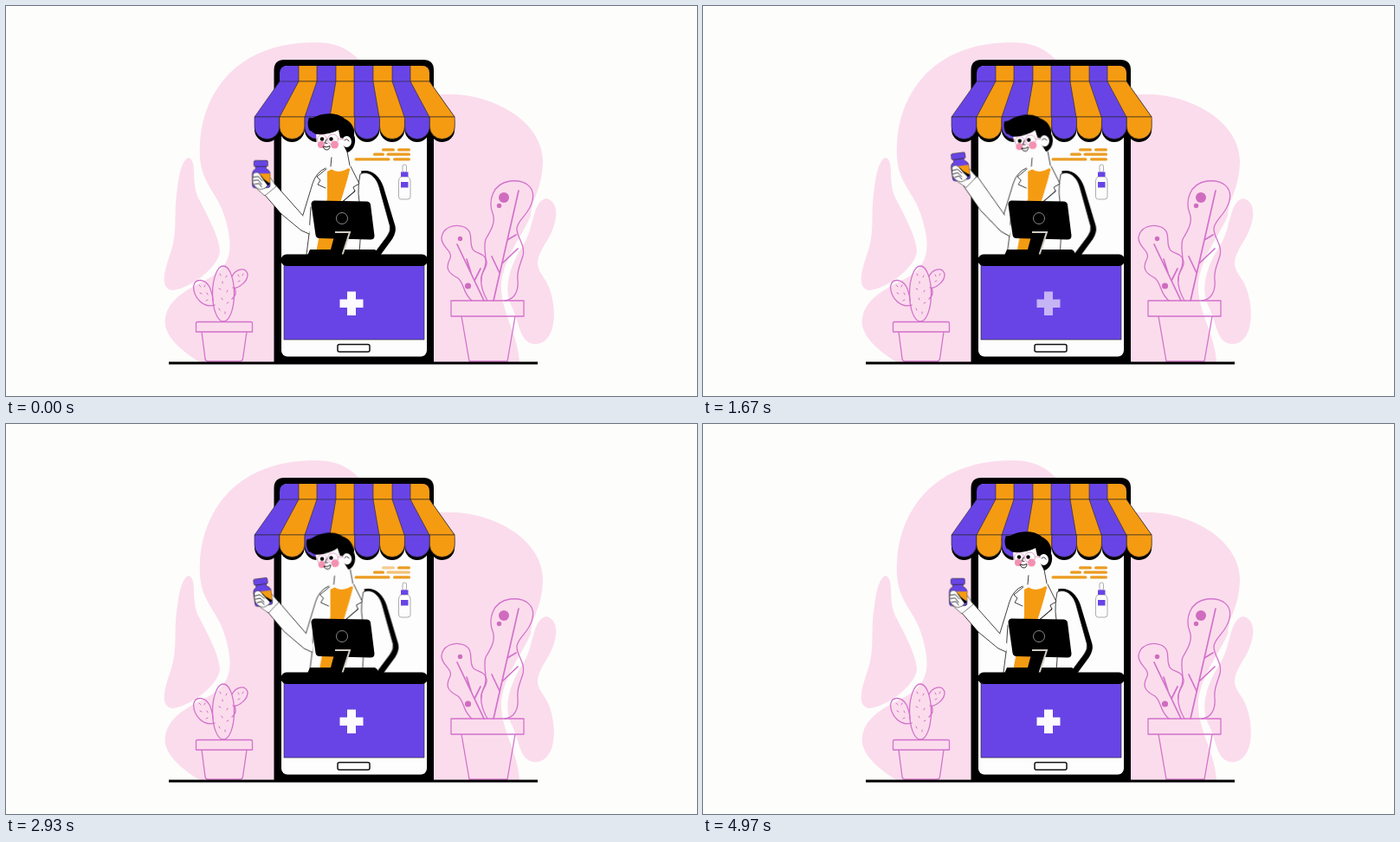
Write an HTML page without scripts that moves like this. It is 798x450 px and loops after 5.01 s.

```html
<!DOCTYPE html>
<html lang="en">
<head>
<meta charset="utf-8">
<title>Pharmacy shop</title>
<style>
html, body { margin: 0; width: 100%; height: 100%; overflow: hidden; background: #fdfdfc; }
svg { display: block; width: 100vw; height: 100vh; }
.purple { fill: #6844e6; }
.orange { fill: #f59b12; }
.blob { fill: #fbdcec; }
.white { fill: #fdfdfd; }
.thin { stroke: #222; stroke-width: .6; }
.line { fill: none; stroke: #111; stroke-width: .8; stroke-linecap: round; stroke-linejoin: round; }
.plant { fill: none; stroke: #d272cc; stroke-width: 1.3; stroke-linejoin: round; stroke-linecap: round; }
.dot { fill: #cf6cc0; }

.body, .head, .sleeve, .lift { animation: 5.01s ease-in-out infinite; }
.body { animation-name: sway; }
.head { animation-name: nod; transform-origin: 384px 188px; }
.sleeve { animation-name: reach; transform-origin: 343px 250px; }
.sleeve path { vector-effect: non-scaling-stroke; }
.lift { animation-name: lift; }
.wrist { animation: tilt 1.2525s ease-in-out infinite; transform-origin: 303px 212px; }
.cross { animation: blink 1.002s infinite; fill: #fdfaff; }

@keyframes sway { 0%, 97%, 100% { transform: none; } 40% { transform: translateX(4.5px); } }
@keyframes nod { 0%, 97%, 100% { transform: rotate(0deg); } 35%, 55% { transform: rotate(-6deg); } }
@keyframes reach {
  0%, 97%, 100% { transform: none; }
  26% { transform: rotate(7.6deg) scale(1.16); }
  50% { transform: rotate(1deg) scale(1.02); }
}
@keyframes lift {
  0%, 97%, 100% { transform: none; }
  26% { transform: translateY(-12px); }
  50% { transform: translateY(-1.5px); }
}
@keyframes tilt { 0%, 100% { transform: rotate(1.5deg); } 42% { transform: rotate(-6.5deg); } }
@keyframes blink { 0%, 13%, 90%, 100% { opacity: 1; } 29%, 63% { opacity: .55; } }

.note rect { animation: 5.01s infinite; fill: #eb9c22; }
.note .a { animation-name: dipA; animation-duration: 1.67s; }
.note .b { animation-name: dipB; }
.note .d { animation-name: dipD; }
.note .f { animation-name: dipF; }
@keyframes dipA { 0%, 52%, 100% { opacity: 1; } 76% { opacity: .5; } }
@keyframes dipB { 0%, 5%, 20%, 66%, 81%, 100% { opacity: 1; } 12.6%, 73.3% { opacity: .45; } }
@keyframes dipD { 0%, 5%, 20%, 51%, 66%, 100% { opacity: 1; } 12.6%, 58.5% { opacity: .6; } }
@keyframes dipF { 0%, 5%, 20%, 35%, 50%, 100% { opacity: 1; } 12.6%, 42.5% { opacity: .55; } }
</style>
</head>
<body>
<svg viewBox="0 0 798 450">
  <defs>
    <path id="flap" d="M287 128v11a14.45 14.45 0 0 0 28.9 0v-11z"/>
    <g id="flaps">
      <use href="#flap"/><use href="#flap" x="57.8"/><use href="#flap" x="115.6"/><use href="#flap" x="173.4"/>
    </g>
    <clipPath id="top"><path d="M316 87V78q0-9 9-9H480q9 0 9 9V87z"/></clipPath>
  </defs>

  <g class="blob">
    <path d="M224 411C205 400 180 380 184 360C188 335 215 325 238 312C262 297 262 275 253 245C244 212 221 205 224 160C226 105 262 42 357 42C395 42 405 60 425 80C450 105 470 102 520 102C575 106 622 140 620 182C618 215 607 222 606 242C598 262 575 290 572 320C570 350 592 380 593 411Z"/>
    <path d="M211 175C222 179 212 205 224 225C236 248 246 268 247 283C245 303 210 327 192 328C177 326 183 305 190 285C199 258 193 238 198 210C200 192 204 177 211 175Z"/>
    <path d="M624 222C640 226 638 250 624 272C610 295 612 300 622 315C636 335 640 388 612 390C592 390 594 365 583 345C572 320 588 290 598 275C610 255 608 225 624 222Z"/>
  </g>

  <!-- cactus -->
  <g class="plant">
    <ellipse cx="251" cy="332" rx="12.5" ry="32"/>
    <path d="M241 345C227 349 217 336 216.500 324C218 313 230 315 235 324C238 331 239 336 239 340"/>
    <path d="M262 325C267 327 280 318 279 309C276 300 265 304 261 312M261 338C265 335 266 330 264 325"/>
    <path stroke-width="1" d="M223 322l2 2M230 322l-1 2M224 331l2 1M232 331l1 2M231 340l2-1M247 309l1 2M255 311l-1 2M250 318v2M246 326l2 1M256 328l-1 2M249 337l1 2M257 342l-2 1M246 349l1 2M253 353v2M268 310l1 2M274 309l-1 2M268 318l2-1"/>
    <path d="M221 364.500H283q1.500 0 1.500 1.500V376H219.500V366q0-1.500 1.500-1.500ZM226 376L230 407q.5 3 3 3H270q3 0 3.500-3L278 376"/>
  </g>

  <!-- leafy plant -->
  <g class="plant">
    <path d="M556 340C549 328 546 317 551 306C558 294 550 281 554 269C560 259 566 249 562 239C557 226 561 205 582 202C602 200 611 211 608 224C605 240 592 245 590 256C589 267 600 274 597 288C593 301 590 306 591 317C592 329 587 339 576 340"/>
    <path d="M538 340C527 331 530 321 522 314C510 308 507 302 513 291C516 282 502 278 503 267C505 255 518 251 529 255C542 261 533 274 540 282C546 287 553 285 555 295C556 303 547 308 549 317"/>
    <path stroke-width="1.700" d="M592 213L563 340M521 275L552 340M589 264L579 270M570 308L561 289M573 297L591 280M537 308L532 292M541 317L548 303"/>
    <path d="M514 340H598V358H514ZM526 358L535 410H579L588 358"/>
  </g>
  <g class="dot">
    <circle cx="575" cy="221" r="6"/><circle cx="569.500" cy="230.500" r="2.700"/>
    <circle cx="524.500" cy="268.500" r="2.700"/><circle cx="533.500" cy="323" r="3.600"/>
  </g>

  <!-- phone -->
  <path d="M188 412H614" stroke="#000" stroke-width="3"/>
  <path d="M309.500 412V74q0-12 12-12H482q12 0 12 12V412Z"/>
  <rect class="white" x="318" y="69" width="168" height="335.500" rx="7"/>

  <!-- notes and dropper -->
  <g class="note">
    <rect class="a" x="434" y="164.300" width="15" height="3.200" rx="1.600"/>
    <rect class="b" x="452" y="164.300" width="15" height="3.200" rx="1.600"/>
    <rect x="424" y="169.600" width="13" height="3.200" rx="1.600"/>
    <rect class="d" x="439.500" y="169.600" width="27.500" height="3.200" rx="1.600"/>
    <rect x="402.500" y="175.300" width="41" height="3.200" rx="1.600"/>
    <rect class="f" x="447" y="175.300" width="20" height="3.200" rx="1.600"/>
  </g>
  <g fill="#fdfdfd" stroke="#999" stroke-width=".8">
    <rect x="458" y="183" width="4.500" height="9" rx="2"/>
    <path d="M456 197H464.500Q467 199 467 202V220q0 3-3 3H456.500q-3 0-3-3V202Q453.500 199 456 197Z"/>
  </g>
  <path class="purple" d="M456 191.500h8.500v5.500h-8.500zM456 203h8.500v6.500h-8.500z"/>

  <!-- awning -->
  <g transform="translate(0 3.500)"><use href="#flaps"/><use href="#flaps" x="28.900"/></g>
  <g clip-path="url(#top)">
    <path class="purple" d="M316 69H489V87H316z"/>
    <path class="orange thin" d="M338 68h21v20h-21zM381 68h21v20h-21zM424 68h22v20h-22zM467 68h23v20h-23z"/>
  </g>
  <path class="purple thin" d="M316 87H489L518 128H287z"/>
  <path class="orange thin" d="M338 87H359L345 128H316zM381 87H402V128H374zM424 87H446L460 128H431zM467 87H489L518 128H489z"/>
  <use href="#flaps" class="purple thin"/>
  <use href="#flaps" class="orange thin" x="28.900"/>

  <!-- pharmacist -->
  <g class="body">
    <path d="M408 191C420 187 431 194 436 209L449.500 254Q451 261 446 269L432 288H405Z"/>
    <path class="white" d="M369 187Q358 192 354 205L343 241L341 259L350 263L347 288H424L410 190L397 182Z"/>
    <path class="line" stroke-width=".6" d="M369 187Q358 192 354 205L343 241M352 232L350 263L347 287"/>
    <path class="orange" d="M371 191Q383 184 398 188L387 224L381 285H358L363 258L371 222Z"/>
    <path class="white" d="M409 194C419 189 428 198 431 209L443.500 254Q444.500 260 440 266L425 286H408L411 240Q404 216 409 194Z" stroke="#111" stroke-width=".8"/>
    <path class="white" d="M371 188L359 197L363 201L360 206L371 214ZM398 185L408 205L401 209L403 214L388 226Z"/>
    <path class="line" d="M370 188L359 197L363 201L360 206L369 210M398 185L408 205L401 209L403 214L388 226"/>
    <path class="line" stroke-width="1.600" d="M403 213L390 225"/>
    <path class="white" d="M376 166L375 184Q374 190 384 191Q394 190 398 184L394 162Z"/>
    <path class="line" stroke-width=".6" d="M376 174L375 185M394 168L397 184"/>

    <g class="sleeve">
      <path class="white" d="M311 206L343 242L352 255L350 263L341 259L318 240L298 217Z"/>
      <path class="line" stroke-width=".6" d="M343 242L311 206L298 217L318 240L341 259L350 263"/>
    </g>
    <g class="lift"><g class="wrist">
      <path class="white" d="M288 200Q284 208 293 214L299 219L312 208L305 198Z" stroke="#222" stroke-width=".6"/>
      <g transform="rotate(-2 294 195)">
        <rect class="purple thin" x="286" y="178.500" width="16" height="7" rx="1.500"/>
        <path class="purple thin" d="M288 185.500H300V188Q304.500 190 304.500 194V207q0 3-3 3H287q-3 0-3-3V194Q284 190 288 188Z"/>
        <path class="orange" d="M292 193.500H304.500V204H292z"/>
        <path d="M291 195L304 205L303 207L292 209Z"/>
      </g>
      <path class="white thin" d="M285 194Q290 190 293 195L299 203L302 207Q300 211 294 212Q286 210 284.500 203Z"/>
      <path class="line" stroke-width=".6" d="M285 198L291 197L296 202M285 202L291 201L295 206M287 206L292 205L295 209"/>
      <path class="line" stroke-width="1.500" d="M294 196L300 204"/>
    </g></g>

    <g class="head">
      <path d="M351 144C348 140 348 133 350 129C354 130 356 128 359 127C368 123 384 123 391 130C400 134 403 142 402 149C405 156 402 167 394 169L384 150Z"/>
      <path class="white" d="M358 144C368 147 379 147 385 142Q388 147 389 154L390 168Q384 175 374 174.500Q361 174 359 168Z"/>
      <path d="M350 137C351 143 354 147 359 148Q373 149 384 143L386 152L391 153L390 138L370 130Z"/>
      <ellipse class="white" cx="393.500" cy="156.500" rx="5.500" ry="6.500"/>
      <path class="line" stroke-width=".6" d="M391 155Q394 152 396 156"/>
      <g fill="#f78fae"><circle cx="364" cy="160" r="4"/><circle cx="379.500" cy="160" r="4.500"/></g>
      <g fill="none" stroke="#dc9cc8" stroke-width=".9">
        <circle cx="365" cy="154" r="5.500"/><circle cx="377.500" cy="154" r="6"/><path d="M370.500 153.500H372M384 153L390 154"/>
      </g>
      <circle cx="365" cy="153.500" r="2.200"/><circle cx="375.500" cy="153.500" r="2.200"/>
      <path class="line" stroke-width=".6" d="M370 154L368 158L371 158.500"/>
      <path d="M366 162Q370 164 374 161.500Q374 166 370 166Q367 165.500 366 162Z" fill="#fff" stroke="#111" stroke-width=".9"/>
    </g>
  </g>

  <!-- till -->
  <path d="M348 288L351 281H375L379 266H396L390 281H426Q430 283 430 288Z"/>
  <path d="M356 224.500L417 225.500Q420.500 226 421 229L425.500 265Q425.500 269.500 421 269.500L362 268Q358 268 357.500 264L352.500 229Q352.500 225 356 224.500Z"/>
  <circle cx="388" cy="245" r="6.500" fill="none" stroke="#aaa" stroke-width=".8"/>
  <path d="M380 261H397L388.500 287" fill="none" stroke="#d0cbc4" stroke-width="2"/>

  <!-- counter -->
  <path class="purple thin" d="M321 298H483V385H321z"/>
  <rect x="317.500" y="286.500" width="169.500" height="13.500" rx="6.500"/>
  <path class="cross" d="M394 329.500H404V338.500H412.500V348H404V357H394V348H385.500V338.500H394Z"/>
  <rect x="383" y="390.500" width="37" height="8.500" rx="2" fill="none" stroke="#111" stroke-width="1.500"/>
</svg>
</body>
</html>
```
